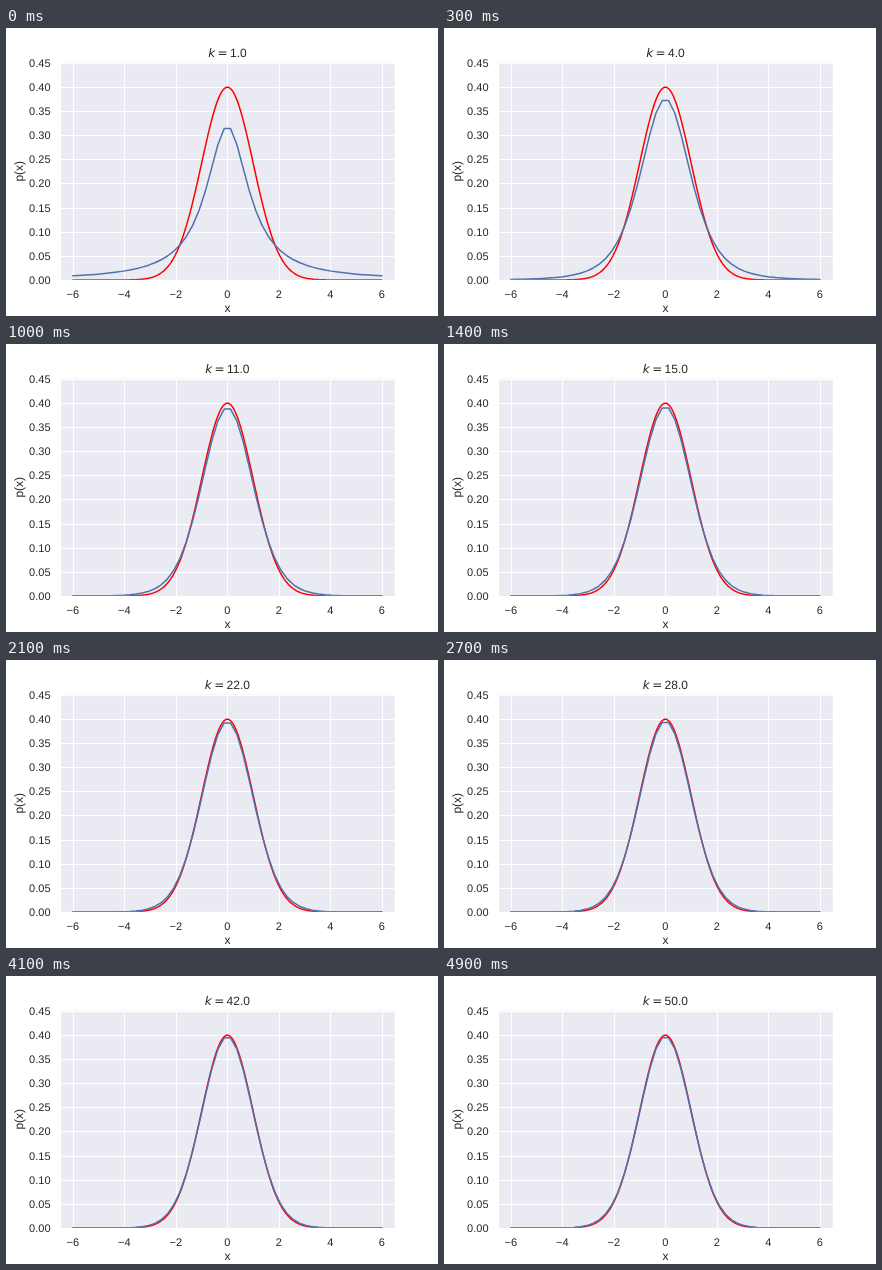
An HTML page with a canvas that plays this animation: 432 px wide and 288 px high, repeating every 5000 ms.

```html
<!DOCTYPE html>
<html lang="en">
<head>
<meta charset="utf-8">
<title>Student t and normal density</title>
<style>
  html, body { margin: 0; width: 100%; height: 100%; overflow: hidden; background: #fff; }
  canvas { display: block; }
</style>
</head>
<body>
<canvas id="plot" width="432" height="288"></canvas>
<script>
const ctx = document.getElementById('plot').getContext('2d');
const LEFT = 54, RIGHT = 388.8, TOP = 34.56, BOTTOM = 252;
const MID = (LEFT + RIGHT) / 2;
const STEP = 100, COUNT = 50;
const SANS = '"Liberation Sans", Arial, sans-serif';
const MATH = '"DejaVu Sans", sans-serif';

const px = x => MID + x * (RIGHT - LEFT) / 13;
const py = y => BOTTOM - y * (BOTTOM - TOP) / 0.45;
const snap = v => Math.round(v) + 0.5;

const normal = x => Math.exp(-x * x / 2) / Math.sqrt(2 * Math.PI);

// Student t density with k degrees of freedom
function student(k) {
  let ratio = 1 / Math.sqrt(Math.PI); // gamma((i+1)/2) / gamma(i/2)
  for (let i = 1; i < k; i++) ratio = i / 2 / ratio;
  const scale = ratio / Math.sqrt(k * Math.PI);
  return x => scale * (1 + x * x / k) ** (-(k + 1) / 2);
}

function text(str, x, y, size, align = 'center', family = SANS, style = '') {
  ctx.font = `${style} ${size}px ${family}`;
  ctx.textAlign = align;
  ctx.fillText(str, x, y);
}

function line(x1, y1, x2, y2, width) {
  ctx.lineWidth = width;
  ctx.beginPath();
  ctx.moveTo(x1, y1);
  ctx.lineTo(x2, y2);
  ctx.stroke();
}

function curve(f, points, color) {
  ctx.strokeStyle = color;
  ctx.lineWidth = 1.5;
  ctx.lineCap = ctx.lineJoin = 'round';
  ctx.beginPath();
  for (let i = 0; i < points; i++) {
    const x = -6 + 12 * i / (points - 1);
    ctx.lineTo(px(x), py(f(x)));
  }
  ctx.stroke();
}

function axes() {
  ctx.fillStyle = '#eaeaf2';
  ctx.fillRect(LEFT, TOP, RIGHT - LEFT, BOTTOM - TOP);
  ctx.strokeStyle = '#fff';
  ctx.fillStyle = '#262626';
  for (let x = -6; x <= 6; x += 2) {
    const gx = snap(px(x));
    line(gx, TOP, gx, BOTTOM, 1);
    text(String(x).replace('-', '\u2212'), px(x), 270, 11);
  }
  for (let i = 0; i < 10; i++) {
    const y = py(i / 20), gy = snap(y);
    line(LEFT, gy, RIGHT, gy, 1);
    text((i / 20).toFixed(2), 44.5, Math.round(y + 4), 11, 'right');
  }
  text('x', MID, 284, 12);
  ctx.save();
  ctx.translate(17, (TOP + BOTTOM) / 2);
  ctx.rotate(-Math.PI / 2);
  text('p(x)', 0, 0, 12);
  ctx.restore();
}

function title(k) {
  const value = k.toFixed(1);
  ctx.font = `12px ${SANS}`;
  const x = MID - (21.8 + ctx.measureText(value).width) / 2;
  text('k', x, 29, 12, 'left', MATH, 'oblique');
  text('=', x + 9.35, 29, 12, 'left', MATH);
  text(value, x + 21.8, 29, 12, 'left');
}

function draw(k) {
  ctx.fillStyle = '#fff';
  ctx.fillRect(0, 0, 432, 288);
  ctx.lineCap = 'butt';
  ctx.textRendering = 'geometricPrecision';
  axes();
  title(k);

  ctx.save();
  ctx.beginPath();
  ctx.rect(LEFT, 35, 335, BOTTOM - 35);
  ctx.clip();
  curve(normal, 300, '#f00');
  curve(student(k), 50, '#4c72b0');
  ctx.restore();

  ctx.strokeStyle = '#fff';
  ctx.lineWidth = 1.25;
  ctx.strokeRect(snap(LEFT), snap(TOP), 335, 217);
}

let shown = 0;
function tick() {
  const k = 1 + Math.floor(performance.now() / STEP) % COUNT;
  if (k !== shown) draw(shown = k);
  requestAnimationFrame(tick);
}
tick();
</script>
</body>
</html>
```
